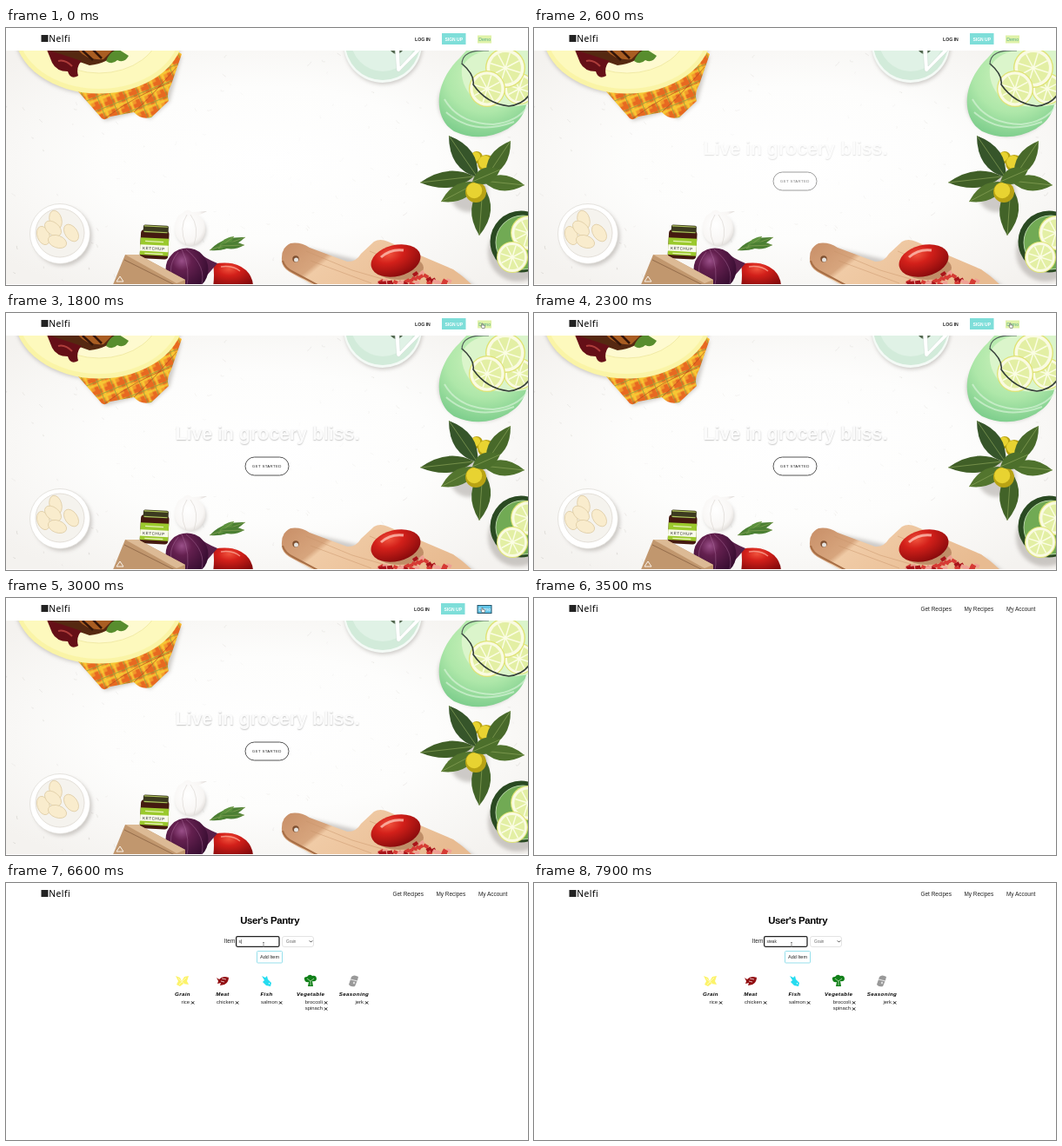
Animation, 600 px wide and 296 px high, one loop 8 s. Source, as an HTML page:

```html
<!DOCTYPE html>
<html lang="en">
<head>
<meta charset="utf-8">
<title>Pantry demo</title>
<style>
  html, body { margin: 0; width: 100%; height: 100%; overflow: hidden; background: #fff; }
  svg { display: block; width: 600px; height: 296px; }
  text { font-family: "Liberation Sans", Arial, sans-serif; fill: #222; }
  .brand { font: 500 10.3px "Noto Sans", "Open Sans", sans-serif; letter-spacing: .5px; fill: #000; }
  .nav { font-size: 6.45px; }
  .small { font-size: 5.2px; }
  .kind { font: italic bold 6.2px "Liberation Sans", Arial, sans-serif; letter-spacing: .35px; text-anchor: middle; fill: #000; }
  .item { font-size: 5.9px; text-anchor: end; }
  .hero { font-size: 21.3px; font-weight: bold; fill: #fbfbfb; text-shadow: .2px .8px 1.5px rgba(0,0,0,.22); }
</style>
</head>
<body>
<svg viewBox="0 0 600 296">
  <defs>
    <radialGradient id="wall" cx=".5" cy=".48" r=".65">
      <stop offset="0" stop-color="#fff"/><stop offset=".5" stop-color="#fdfdfc"/><stop offset="1" stop-color="#f4f2ef"/>
    </radialGradient>
    <radialGradient id="onion" cx=".38" cy=".3" r=".75">
      <stop offset="0" stop-color="#9a5089"/><stop offset=".3" stop-color="#64204f"/><stop offset="1" stop-color="#300a2c"/>
    </radialGradient>
    <radialGradient id="tomato" cx=".4" cy=".25" r=".8">
      <stop offset="0" stop-color="#f0523c"/><stop offset=".35" stop-color="#d3201a"/><stop offset="1" stop-color="#83090b"/>
    </radialGradient>
    <radialGradient id="bulb" cx=".4" cy=".4" r=".7">
      <stop offset="0" stop-color="#fff"/><stop offset=".7" stop-color="#f8f6f4"/><stop offset="1" stop-color="#d8d3cf"/>
    </radialGradient>
    <radialGradient id="jug" cx=".5" cy=".3" r=".7">
      <stop offset="0" stop-color="#d0f3bd"/><stop offset=".6" stop-color="#aee7a9"/><stop offset="1" stop-color="#80cf8e"/>
    </radialGradient>
    <linearGradient id="wood" x2="1" y2=".3">
      <stop offset="0" stop-color="#c78d66"/><stop offset=".3" stop-color="#d7a57d"/>
      <stop offset=".34" stop-color="#f0cba6"/><stop offset="1" stop-color="#e8bb91"/>
    </linearGradient>
    <pattern id="plaid" width="15" height="15" patternUnits="userSpaceOnUse" patternTransform="rotate(-22)">
      <rect width="15" height="15" fill="#f3982a"/>
      <path d="M0 4H15M4 0V15" stroke="#e04f1b" stroke-width="4.5" opacity=".65"/>
      <path d="M0 11H15M11 0V15" stroke="#f9d936" stroke-width="3" opacity=".75"/>
      <path d="M0 7.5H15M7.5 0V15" stroke="#8d9c3c" stroke-width="1" opacity=".75"/>
    </pattern>
    <filter id="soft" x="-30%" y="-30%" width="160%" height="160%"><feGaussianBlur stdDeviation="2"/></filter>
    <clipPath id="photoClip"><rect y="26" width="600" height="269"/></clipPath>
  </defs>
  <rect width="600" height="296" fill="#fff"/>

  <g id="home">
    <g clip-path="url(#photoClip)">
      <rect y="26" width="600" height="270" fill="url(#wall)"/>
      <g id="flecks"></g>
      <g filter="url(#soft)" fill="#8b8580" opacity=".4">
        <ellipse cx="107" cy="7" rx="97" ry="70"/>
        <path d="M86 76L114 107L150 97L166 105L188 85L202 32Z"/>
        <circle cx="434" cy="20" r="45"/><circle cx="65" cy="240" r="34"/>
        <ellipse cx="545" cy="86" rx="48" ry="39"/><circle cx="588" cy="258" r="34"/>
        <circle cx="213" cy="234" r="17"/><path d="M318 270L355 298H540L520 283L400 266L340 252Z"/>
        <ellipse cx="532" cy="190" rx="22" ry="22"/>
      </g>

      <path d="M82 72L110 104Q114 107 120 102L147 97Q155 106 167 103L187 84Q184 76 190 65L202 30L190 22Z" fill="url(#plaid)"/>
      <path d="M114 104Q148 78 188 63M147 97Q170 76 196 45" fill="none" stroke="#b0421b" stroke-width="1" opacity=".6"/>
      <ellipse cx="107" cy="5" rx="97" ry="70.5" fill="#faf4a6"/>
      <ellipse cx="107" cy="3" rx="93" ry="67" fill="#fdf9bd"/>
      <ellipse cx="107" cy="0" rx="70" ry="52" fill="#fefad0" stroke="#eee69c" stroke-width=".8"/>
      <path d="M48 24Q58 38 76 36L96 43Q118 41 132 24Z" fill="#552811"/>
      <path d="M82 24Q92 38 112 36L124 24Z" fill="#a95d22"/>
      <path d="M88 26L100 37M100 25L110 35" stroke="#331509" stroke-width="2.5"/>
      <path d="M47 25Q66 31 87 38Q80 45 83 55Q74 60 71 50Q58 50 53 40Z" fill="#650f17"/>
      <path d="M60 38Q68 36 76 44" stroke="#ae3d3b" stroke-width="2" fill="none"/>
      <path d="M115 38Q120 25 130 25L141 32Q136 41 128 37Q122 43 115 38Z" fill="#588d2e"/>

      <circle cx="433" cy="18" r="45" fill="#f4faf6"/>
      <circle cx="433" cy="17" r="43" fill="#d2ebda"/>
      <ellipse cx="433" cy="12" rx="37" ry="38" fill="#e0f2e6"/>
      <path d="M442 26Q449 34 456 26Z" fill="#52674f"/>
      <path d="M447 24L449 49Q452 52 454 48L478 24H472L453 44L452 24Z" fill="#fff" stroke="#c3d5ca" stroke-width=".4"/>

      <path d="M521 35C490 65 492 105 515 119Q546 133 577 116C598 103 603 90 602 25H530Z" fill="url(#jug)"/>
      <path d="M504 82Q520 110 560 111Q588 108 600 90M506 97Q538 125 584 108" fill="none" stroke="#dff7df" stroke-width="2" opacity=".6"/>
      <path d="M524 46Q533 26 565 25H602V88Q565 95 540 84Q522 67 524 46Z" fill="#dbf5cb"/>
      <g id="jugLemons"></g>
      <path d="M524 41Q539 54 537 65Q552 87 578 90Q595 88 602 76" fill="none" stroke="#343e39" stroke-width="1.6"/>
      <path d="M524 42Q524 24 555 26" fill="none" stroke="#52605a" stroke-width="1.2"/>

      <g id="plant"></g>

      <circle cx="592" cy="246" r="35.5" fill="#2a4a22"/>
      <circle cx="594" cy="247" r="31" fill="#71aa54"/>
      <circle cx="594" cy="247" r="31" fill="none" stroke="#b9d7aa" stroke-width="1"/>
      <g id="glassLemons"></g>

      <circle cx="62" cy="237" r="34.5" fill="#fff" stroke="#e0ddd9" stroke-width=".8"/>
      <circle cx="62" cy="236" r="28" fill="#f5f3ee" stroke="#e3dfd8" stroke-width="1"/>
      <g id="cloves"></g>

      <path d="M203 213Q208 207 214 212L231 211L221 216Q231 222 229 236Q224 252 209 251Q194 246 194 230Q194 217 203 213Z" fill="url(#bulb)"/>
      <path d="M208 215Q198 230 207 250M212 215Q223 229 216 250" fill="none" stroke="#ddd8d4" stroke-width=".7"/>

      <g transform="rotate(3 171 247)">
        <rect x="154.5" y="233" width="32.5" height="33" rx="4" fill="#451a10"/>
        <rect x="157" y="227" width="29" height="9" rx="2" fill="#3c3a20"/>
        <path d="M158 228.5H185M158 235H185" stroke="#b3c75d" stroke-width="1.2"/>
        <rect x="154.5" y="242" width="32.5" height="20" fill="#9bc92d"/>
        <rect x="154.5" y="250" width="32.5" height="7.5" fill="#f9faeb"/>
        <path d="M160 246H181M160 260H181" stroke="#e6f2b6" stroke-width="1.3"/>
        <text x="157.5" y="255.6" font-size="4.6" letter-spacing=".5">KETCHUP</text>
      </g>

      <g id="arugula"></g>
      <path d="M238 272Q262 267 276 279Q284 287 284 298H238Q240 284 238 272Z" fill="url(#tomato)"/>
      <path d="M247 275Q260 273 269 280" fill="none" stroke="#ffb5a4" stroke-width="1.5" opacity=".7"/>
      <path d="M219 257Q230 266 243 271L230 286Z" fill="#59204a"/>
      <circle cx="208" cy="278" r="24.5" fill="url(#onion)"/>
      <path d="M198 258Q180 280 200 300M207 255Q232 275 224 298M202 255Q213 277 207 302" fill="none" stroke="#b67ba9" stroke-width=".6" opacity=".65"/>
      <path d="M137 261L152 261L206 290V298H122Z" fill="#c1976e"/>
      <path d="M137 261L152 261L206 290L196 294Z" fill="#dcba95"/>
      <path d="M136 267L194 296" stroke="#936b4a" stroke-width="1"/>
      <path d="M131 286L135 292H127Z" fill="none" stroke="#fbf4ec" stroke-width="1"/>

      <path d="M317 264Q317 253 327 248Q338 246 349 253L392 269Q402 270 408 260L423 246Q430 242 439 246L514 278Q526 286 538 298H357L326 281Q316 275 317 264Z" fill="url(#wood)"/>
      <path d="M318 268Q320 276 330 281L360 297" fill="none" stroke="#a86f46" stroke-width="2"/>
      <path d="M345 257L398 279L460 297M350 268L420 294M418 257L470 279" fill="none" stroke="#c9936a" stroke-width=".8" opacity=".6"/>
      <circle cx="333" cy="266" r="3.7" fill="#7d4f30"/><circle cx="333.5" cy="267" r="2.5" fill="#e5e2de"/>
      <ellipse cx="452" cy="276" rx="28" ry="14" fill="#8d5230" opacity=".45"/>
      <ellipse cx="448" cy="268" rx="29" ry="18" fill="url(#tomato)" transform="rotate(-14 448 268)"/>
      <path d="M431 264Q442 254 457 256" fill="none" stroke="#ffc9bc" stroke-width="3" opacity=".75"/>
      <g id="diced"></g>
    </g>

    <g id="account">
      <text x="470" y="15" class="small" font-weight="600">LOG IN</text>
      <rect x="501" y="6" width="27.5" height="13" fill="#7eded9"/>
      <text x="504.5" y="14.6" font-size="5" font-weight="bold" style="fill:#fff">SIGN UP</text>
    </g>
    <rect id="demoBox" x="542" y="8.5" width="16" height="9" fill="#dff2a8"/>
    <text id="demoText" x="543.2" y="15" class="small">Demo</text>

    <g id="welcome">
      <text x="194.5" y="146" class="hero">Live in grocery bliss.</text>
      <rect x="275" y="166" width="50" height="21" rx="10.5" fill="#fff" stroke="#555" stroke-width="1"/>
      <text x="283" y="178" font-size="4.3" letter-spacing=".37">GET STARTED</text>
    </g>
  </g>

  <g id="inside">
    <text x="444.5" y="15.4" class="nav">Get Recipes</text>
    <text x="494.5" y="15.4" class="nav">My Recipes</text>
    <text x="543" y="15.4" class="nav">My Account</text>
  </g>

  <g id="pantry">
    <text x="269.3" y="47.2" font-size="11.4" font-weight="bold" letter-spacing="-.4" style="fill:#000">User's Pantry</text>
    <text x="250.8" y="69.2" font-size="6.4">Item</text>
    <rect id="field" x="264.6" y="61.7" width="49.4" height="11.6" rx="1.5" fill="#fff"/>
    <text id="entry" x="267.6" y="69.1" font-size="4.7"></text>
    <rect id="caret" y="65" width=".5" height="5" fill="#222"/>
    <rect x="317.5" y="61.5" width="36" height="12" rx="2.5" fill="#fff" stroke="#dcdcdc" stroke-width=".8"/>
    <text x="322" y="69.1" font-size="4.7" style="fill:#666">Grain</text>
    <path d="M348.8 66.4L350.5 68.1L352.2 66.4" fill="none" stroke="#333" stroke-width=".9"/>
    <rect id="add" x="288.5" y="78.5" width="29" height="13.5" rx="1" fill="#fff" stroke="#79d6e6" stroke-width=".9"/>
    <text x="292" y="87.2" font-size="5.5">Add Item</text>

    <path d="M195 107L200 109L202 113L205 108L210 107L208 113L210 117L204 116L200 119L196 117L198 113Z" fill="#fcf36a"/>
    <path d="M198 110L206 117M207 109L199 117" stroke="#fffbd0" stroke-width=".8"/>
    <path d="M242 109L245 111Q249 106 256 109Q256 114 251 117L246 118L247 115L243 116L244 113Z" fill="#920e12"/>
    <path d="M248 110L253 111M247 113L251 114" stroke="#fff" stroke-width=".7"/>
    <path d="M294 107L298 109L300 107L301 111L305 115L304 119L299 118L295 114L297 112Z" fill="#25dcf0"/>
    <circle cx="302.5" cy="115.8" r=".7" fill="#fff"/>
    <path d="M343 111Q342 108 346 108Q349 104 352 107Q357 106 357 111Q356 114 352 113L353 119H347L348 114Q344 115 343 111Z" fill="#118019"/>
    <path d="M346 110L350 113L354 110M350 113V118" fill="none" stroke="#bce0b5" stroke-width=".8"/>
    <path d="M397 108Q400 105 405 108L404 112L401 119Q396 120 394 117L396 111Z" fill="#999"/>
    <path d="M396 111L404 113" stroke="#fff" stroke-width=".8"/><circle cx="400" cy="115" r="1.2" fill="#ddd"/>
    <g id="lists"></g>
  </g>

  <rect x="40.5" y="8" width="8" height="8" fill="#222"/>
  <text x="49.2" y="16.4" class="brand">Nelfi</text>

  <g id="cursor">
    <path id="arrow" d="M0 0V5.3L1.3 4.2L2.2 6L3.1 5.5L2.2 3.8H3.9Z" fill="#fff" stroke="#555" stroke-width=".6"/>
    <path id="hand" d="M0 0V3L-1.2 2.8L.2 5.5H3.1L3.6 2.5L1 2V0Z" fill="#fff" stroke="#555" stroke-width=".6"/>
    <path id="beam" d="M-1 -1H1M0 -1V4M-1 4H1" fill="none" stroke="#555" stroke-width=".6"/>
  </g>
</svg>
<script>
const $ = id => document.getElementById(id);
const add = (id, markup) => $(id).insertAdjacentHTML("beforeend", markup);
const show = (id, on) => $(id).style.display = on ? "" : "none";

let seed = 17;
const rand = () => (seed = seed * 16807 % 2147483647) / 2147483647;

// w is the widest part of the blade
function leaf(id, x1, y1, x2, y2, w, color) {
  const dx = x2 - x1, dy = y2 - y1, k = w / Math.hypot(dx, dy);
  const mx = x1 + dx * .45, my = y1 + dy * .45;
  add(id, `<path d="M${x1} ${y1}Q${mx - dy * k} ${my + dx * k} ${x2} ${y2}Q${mx + dy * k} ${my - dx * k} ${x1} ${y1}Z" fill="${color}"/>
    <path d="M${x1} ${y1}L${x2} ${y2}" stroke="#8aa45a" stroke-width=".7"/>`);
}

function lemon(id, x, y, r) {
  let spokes = "";
  for (let i = 0; i < 8; i++) {
    const a = i * Math.PI / 4 + .3;
    spokes += `M${x} ${y}L${x + Math.cos(a) * r * .77} ${y + Math.sin(a) * r * .77}`;
  }
  add(id, `<circle cx="${x}" cy="${y}" r="${r}" fill="#dfe374"/><circle cx="${x}" cy="${y}" r="${r * .94}" fill="#fafbe2"/>
    <circle cx="${x}" cy="${y}" r="${r * .78}" fill="#e3efa4"/><path d="${spokes}" stroke="#fbfde4" stroke-width="1.5"/>`);
}

for (let i = 0; i < 150; i++) {
  const x = rand() * 600, y = 26 + rand() * 270;
  const o = Math.min(.5, Math.hypot((x - 300) / 300, (y - 150) / 150) * .38);
  add("flecks", `<path d="M${x} ${y}q${rand() * 5 - 2} ${rand() * 3} ${rand() * 9 - 4} ${rand() * 8 - 4}" fill="none" stroke="#c4c0bb" stroke-width="${.4 + rand() * .6}" opacity="${o}"/>`);
}

lemon("jugLemons", 590, 70, 18);
lemon("jugLemons", 574, 46, 23);
lemon("jugLemons", 553, 70, 21);
lemon("glassLemons", 600, 236, 20);
lemon("glassLemons", 582, 264, 18);

const ball = (x, y, r) => add("plant", `<circle cx="${x}" cy="${y}" r="${r}" fill="#b9a314"/>
  <circle cx="${x - r * .15}" cy="${y - r * .15}" r="${r * .75}" fill="#e8d331"/>`);
ball(541, 149, 7);
ball(552, 156, 10);
[[538, 171, 476, 178, 19, "#405f27"], [542, 172, 509, 124, 22, "#36552a"],
 [552, 172, 580, 130, 19, "#48692a"], [548, 176, 596, 181, 18, "#4f722d"],
 [542, 178, 500, 200, 18, "#53752e"], [548, 182, 544, 239, 22, "#426328"]]
  .forEach(l => leaf("plant", ...l));
ball(540, 189, 12);
leaf("plant", 536, 177, 568, 163, 18, "#4c6f2b");

leaf("arugula", 234, 256, 275, 241, 10, "#4b7f33");
leaf("arugula", 244, 254, 262, 240, 8, "#5b913d");
leaf("arugula", 246, 251, 274, 250, 8, "#4b7f33");

[[43, 239, 70], [57, 221, 75], [75, 236, 55], [54, 231, 40], [59, 246, 20]].forEach(([x, y, a]) =>
  add("cloves", `<ellipse cx="${x}" cy="${y}" rx="11" ry="7" transform="rotate(${a} ${x} ${y})" fill="#f9eccd" stroke="#dcc9a0" stroke-width=".7"/>`));

for (let i = 0; i < 36; i++) {
  const x = 426 + rand() * 82, y = 294 - rand() * (x > 465 ? 12 : 4);
  add("diced", `<rect x="${x}" y="${y}" width="6" height="4" transform="rotate(${rand() * 80 - 40} ${x} ${y})" fill="${["#a9141a", "#d63a34", "#efa094"][i % 3]}"/>`);
}

// heading, heading centre, right edge of items, items
[["Grain", 203, 211, ["rice"]], ["Meat", 249, 262, ["chicken"]], ["Fish", 299.5, 312, ["salmon"]],
 ["Vegetable", 350.2, 364, ["broccoli", "spinach"]], ["Seasoning", 400, 411, ["jerk"]]]
  .forEach(([name, cx, right, items]) => {
    add("lists", `<text class="kind" x="${cx}" y="129.5">${name}</text>`);
    items.forEach((item, i) => {
      const y = 139.3 + i * 7.1;
      add("lists", `<text class="item" x="${right}" y="${y}">${item}</text>
        <path d="M${right + 2} ${y - 3}l3.2 3.2m0 -3.2l-3.2 3.2" stroke="#111" stroke-width="1"/>`);
    });
  });

// time, x, y
const path = [[1000, 453, 3], [1100, 449.5, 7], [1300, 465, 8], [1700, 545, 12], [1800, 547, 12],
  [4700, 547, 10], [5400, 293.5, 94], [5700, 293.5, 94], [6100, 296, 69.5]];
const ease = p => p * p * (3 - 2 * p);

function place(t) {
  const i = path.findIndex(p => p[0] > t);
  if (i < 0) return path.at(-1).slice(1);
  if (i === 0) return path[0].slice(1);
  const [t0, x0, y0] = path[i - 1], [t1, x1, y1] = path[i];
  const p = ease((t - t0) / (t1 - t0));
  return [x0 + (x1 - x0) * p, y0 + (y1 - y0) * p];
}

const word = "steak", keyTimes = [6600, 6800, 7000, 7300, 7500];

function draw(t) {
  const home = t < 3200, clicked = t >= 2900, focused = t >= 6200;
  show("home", home);
  show("inside", !home);
  show("pantry", t >= 3900);
  $("welcome").style.opacity = Math.max(0, Math.min(1, (t - 200) / 700));
  $("account").setAttribute("transform", `translate(${clicked ? -1 : 0} 0)`);

  const box = $("demoBox");
  box.setAttribute("fill", clicked ? "#62c5e8" : "#dff2a8");
  box.setAttribute("stroke", clicked ? "#24556b" : "none");
  $("demoText").style.fill = clicked ? "#fff" : "#55aa8a";

  const typed = word.slice(0, keyTimes.filter(k => t >= k).length);
  const entry = $("entry");
  entry.textContent = typed || "rice, chicken, etc.";
  entry.style.fill = typed ? "#222" : "#aaa";
  $("field").setAttribute("stroke", focused ? "#222" : "#f3f3f3");
  $("field").setAttribute("stroke-width", focused ? 1.3 : .6);
  $("caret").setAttribute("x", 268 + (typed ? entry.getComputedTextLength() : 0));
  show("caret", focused && t < 7600 && (t - 6200) % 1000 < 500);
  $("add").setAttribute("stroke", t >= 5400 && t < 5800 ? "#4fc8df" : "#8bdce9");

  const [x, y] = place(t);
  const kind = t >= 1700 && t < 4800 ? "hand" : t >= 6000 ? "beam" : "arrow";
  show("cursor", t >= 1000);
  $("cursor").setAttribute("transform", `translate(${x} ${y})`);
  ["arrow", "hand", "beam"].forEach(k => show(k, k === kind));
}

const start = performance.now();
function tick() {
  const t = (performance.now() - start) % 8000;
  draw(Math.floor(t / 100) * 100);
  requestAnimationFrame(tick);
}
tick();
</script>
</body>
</html>
```
